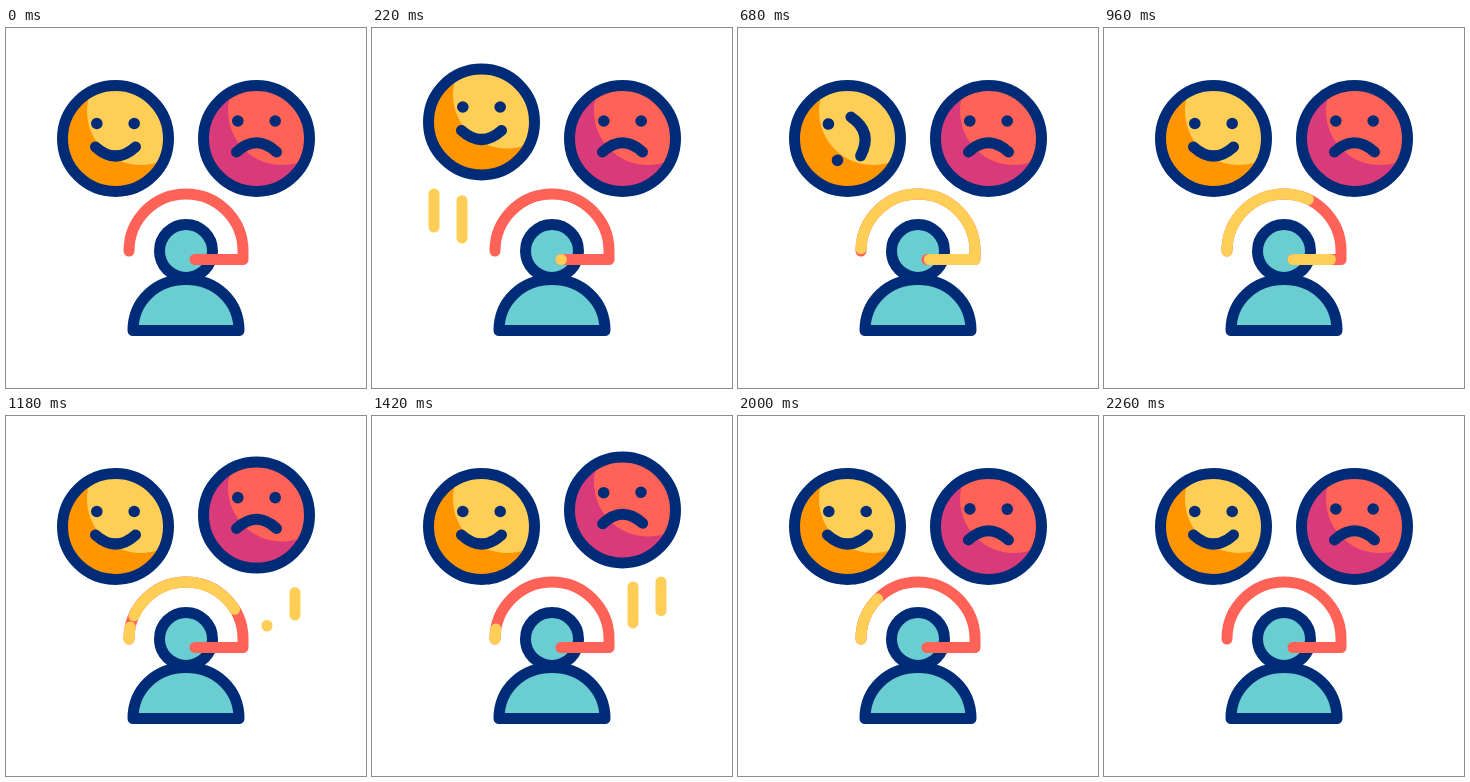
An HTML page for the animation above (2400 ms loop, 360 by 360 pixels).

```html
<!DOCTYPE html>
<html lang="en">
<head>
<meta charset="utf-8">
<title>Customer mood</title>
<style>
html, body { margin: 0; width: 100%; height: 100%; overflow: hidden; background: #fff; }
svg { display: block; width: 100vw; height: 100vh; }
.ink { stroke: #002c77; stroke-width: 11; stroke-linecap: round; stroke-linejoin: round; }
.line { fill: none; stroke-width: 11; stroke-linecap: round; stroke-linejoin: round; }
.red { stroke: #ff6257; }
.gold { stroke: #ffce57; }
.eye { fill: #002c77; }
</style>
</head>
<body>
<svg viewBox="0 0 360 360">
  <defs>
    <clipPath id="disc"><circle r="50"/></clipPath>
  </defs>

  <g id="dashes">
    <path class="line gold" pathLength="1" d="M62 199V166"/>
    <path class="line gold" pathLength="1" d="M90 210V171"/>
    <path class="line gold" pathLength="1" d="M289 199V166"/>
    <path class="line gold" pathLength="1" d="M261 210V171"/>
  </g>

  <g id="happy">
    <g clip-path="url(#disc)">
      <circle r="50" fill="#ff9500"/>
      <circle cx="25.5" cy="-27.5" r="54" fill="#ffce57"/>
    </g>
    <circle class="ink" r="53" fill="none"/>
    <g class="features">
      <circle class="eye" cx="-18.7" cy="-15" r="5.8"/>
      <circle class="eye" cx="18.7" cy="-15" r="5.8"/>
      <path class="ink" fill="none" d="M-20 8.5Q0 26.5 20 8.5"/>
    </g>
  </g>

  <g id="sad">
    <g clip-path="url(#disc)">
      <circle r="50" fill="#d93b7a"/>
      <circle cx="25.5" cy="-27.5" r="54" fill="#ff6257"/>
    </g>
    <circle class="ink" r="53" fill="none"/>
    <g class="features">
      <circle class="eye" cx="-18.7" cy="-17.5" r="5.8"/>
      <circle class="eye" cx="18.7" cy="-17.5" r="5.8"/>
      <path class="ink" fill="none" d="M-20 13.5Q0 -5 20 13.5"/>
    </g>
  </g>

  <g class="ink" fill="#69cdd1">
    <circle cx="180" cy="223" r="26.5"/>
    <path d="M127 302.5C127 273 150 251.5 180 251.5S233 273 233 302.5Z"/>
  </g>

  <path class="line red" d="M189 231.5H237V223A57 57 0 0 0 123 223"/>
  <g id="flow">
    <path class="line gold" pathLength="1" d="M189 231.5H237V223A57 57 0 0 0 123 223"/>
    <path class="line gold" pathLength="1" d="M189 231.5H237V223A57 57 0 0 0 123 223"/>
    <path class="line gold" pathLength="1" d="M189 231.5H237V223A57 57 0 0 0 123 223"/>
  </g>
</svg>
<script>
const LOOP = 2400, SAD_DELAY = 1080, JUMP = 16.5;
const $ = s => document.querySelector(s);

const phase = (t, a, b) => Math.min(1, Math.max(0, (t - a) / (b - a)));
const smooth = (t, a, b) => { const p = phase(t, a, b); return p * p * (3 - 2 * p); };
const cubic = (t, a, b) => {
  const p = phase(t, a, b);
  return p < .5 ? 4 * p ** 3 : 1 - 4 * (1 - p) ** 3;
};

// Each stroke: [element, head start, head end, tail start, tail end]
const dashes = [...$('#dashes').children];
const flow = [...$('#flow').children];
const strokes = [
  [dashes[0], 20, 150, 300, 480],
  [dashes[1], 90, 240, 310, 490],
  [dashes[2], 20 + SAD_DELAY, 150 + SAD_DELAY, 300 + SAD_DELAY, 480 + SAD_DELAY],
  [dashes[3], 90 + SAD_DELAY, 240 + SAD_DELAY, 310 + SAD_DELAY, 490 + SAD_DELAY],
  [flow[0], 210, 710, 644, 1267],
  [flow[1], 860, 1260, 965, 1486],
  [flow[2], 1520, 1920, 1625, 2146]
];

function trim(el, from, to) {
  const len = to - from;
  el.style.display = len > 0 ? '' : 'none';
  el.setAttribute('stroke-dasharray', len + ' 2');
  el.setAttribute('stroke-dashoffset', -from);
}

function face(id, x, t, dir) {
  const y = 110.5 - JUMP * (smooth(t, 0, 160) - smooth(t, 440, 560));
  const turn = dir * 360 * cubic(t, 290, 960);
  $(id).setAttribute('transform', `translate(${x} ${y})`);
  $(id + ' .features').setAttribute('transform', `rotate(${turn})`);
}

function draw(t) {
  face('#happy', 109.5, t, 1);
  face('#sad', 250.5, t - SAD_DELAY, -1);
  for (const [el, h0, h1, t0, t1] of strokes) trim(el, smooth(t, t0, t1), smooth(t, h0, h1));
}

const start = performance.now();
function tick() {
  draw((performance.now() - start) % LOOP);
  requestAnimationFrame(tick);
}
draw(0);
requestAnimationFrame(tick);
</script>
</body>
</html>
```
